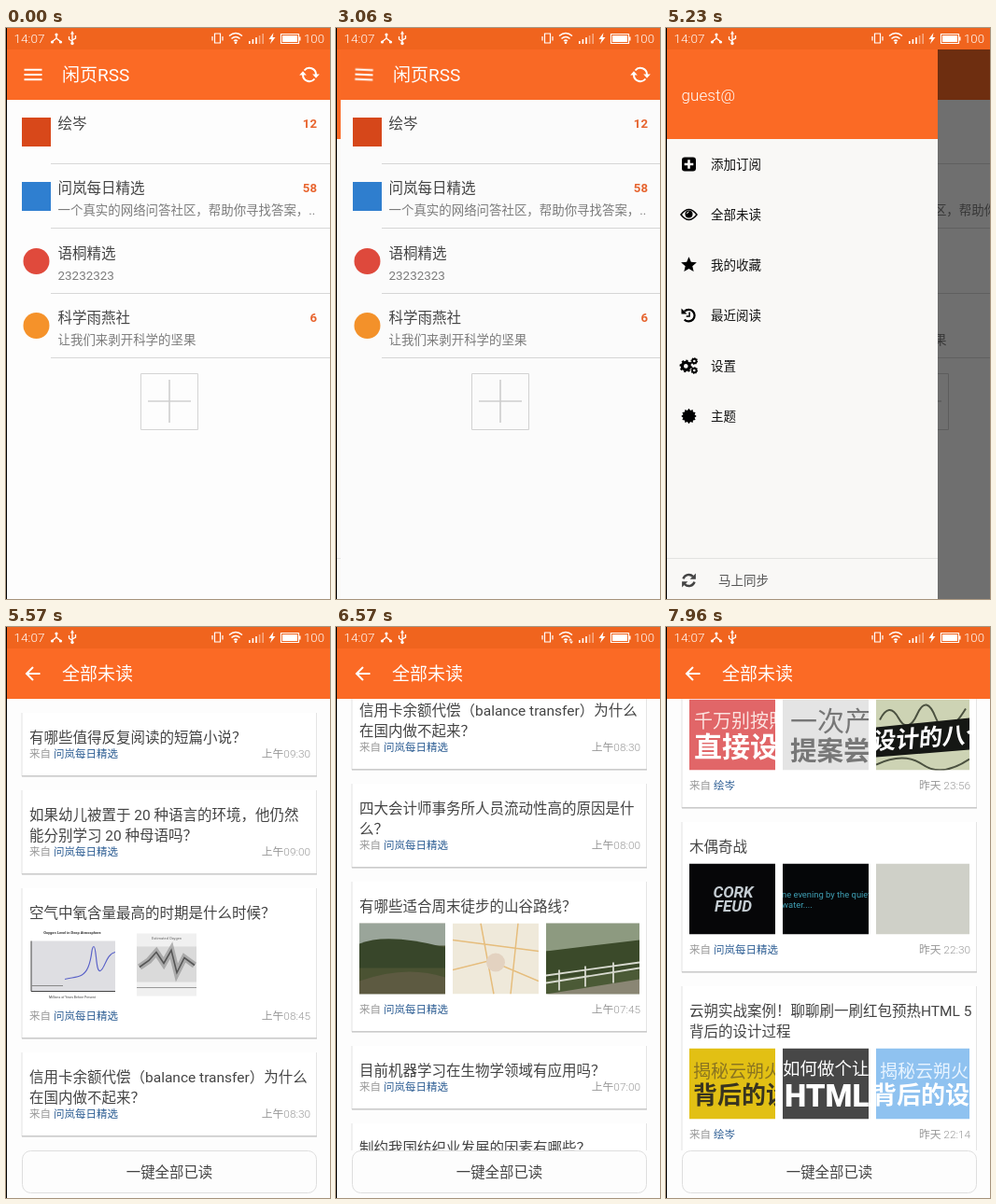
An HTML page that plays this animation: 347x612 px, repeating every 8000 ms.

```html
<!DOCTYPE html>
<html lang="zh-CN">
<head>
<meta charset="utf-8">
<title>闲页RSS</title>
<style>
  html, body { margin: 0; width: 100%; height: 100%; overflow: hidden; background: #fdfdfd; }
  #stage { display: block; width: 347px; height: 612px; }
  text { font-family: Roboto, "Noto Sans CJK SC", "Noto Sans CJK", sans-serif; white-space: pre; }
</style>
</head>
<body>
<svg id="stage" viewBox="0 0 347 612"></svg>
<script>
const LOOP = 8000;
const ORANGE = '#fb6a25', PAPER = '#fdfdfd';

// Drawing helpers
const rect = (x, y, w, h, fill, more = '') =>
  `<rect x="${x}" y="${y}" width="${w}" height="${h}" fill="${fill}" ${more}/>`;
const disc = (x, y, r, fill, more = '') =>
  `<circle cx="${x}" cy="${y}" r="${r}" fill="${fill}" ${more}/>`;
const line = (d, stroke, width, more = '') =>
  `<path d="${d}" fill="none" stroke="${stroke}" stroke-width="${width}" ${more}/>`;
const shape = (d, fill, more = '') => `<path d="${d}" fill="${fill}" ${more}/>`;
const text = (x, middle, size, str, fill, more = '') =>
  `<text x="${x}" y="${middle + size * 0.37}" font-size="${size}" fill="${fill}" ${more}>${str}</text>`;
const at = (x, y, body) => `<g transform="translate(${x} ${y})">${body}</g>`;
const twice = body => body + `<g transform="rotate(180)">${body}</g>`;
const END = 'text-anchor="end"', MID = 'text-anchor="middle"';
const BOLD = 'font-weight="700"', LIGHT = 'font-weight="300"';

const star = (points, outer, inner) => {
  const corners = Array.from({ length: points * 2 }, (_, i) => {
    const r = i % 2 ? inner : outer, a = i * Math.PI / points - Math.PI / 2;
    return `${(r * Math.cos(a)).toFixed(2)},${(r * Math.sin(a)).toFixed(2)}`;
  });
  return `<polygon points="${corners.join(' ')}"/>`;
};
const cog = (x, y, r) =>
  disc(x, y, r * 0.6, 'none', `stroke="#000" stroke-width="${r * 0.5}"`) +
  disc(x, y, r * 0.88, 'none', `stroke="#000" stroke-width="${r * 0.3}" pathLength="16" stroke-dasharray="1"`);

// Status bar
const signal = [3, 5, 7, 9, 11].map((h, i) =>
  rect(260 + i * 3.6, 17 - h, 1.6, h, '#fff', `opacity="${i < 3 ? 1 : 0.45}"`)).join('');
const statusBar = rect(0, 0, 347, 23, '#f0641e') +
  text(8.5, 11, 13.6, '14:07', '#fff', LIGHT) +
  line('M54 7V11L49 15M54 11L59 15', '#fff', 1.3) +
  disc(54, 7, 1.6, '#fff') + disc(49.5, 15, 1.6, '#fff') + disc(58.5, 15, 1.6, '#fff') +
  line('M71 5V17M67.5 9V12L71 14.5M74.5 8V11L71 13', '#fff', 1.3) +
  shape('M71 3L73 6.5H69z', '#fff') + disc(71, 16.5, 1.7, '#fff') +
  line('M223.5 6H229.5V16H223.5zM221 9V13.5M232 9V13.5', '#fff', 1.2) +
  line('M239 8.5Q246 2.5 253 8.5M241.5 11.5Q246 7.5 250.5 11.5M244 14Q246 12.3 248 14', '#fff', 1.5) +
  disc(246, 15.8, 1.3, '#fff') +
  `<g id="traffic">${shape('M249 14.5L251 12L253 14.5zM250 15.5H254L252 18z', '#fff')}</g>` +
  signal +
  shape('M286.5 5L281.5 12H284.5L283 17L288.5 10H285.5z', '#fff') +
  line('M294.5 6.5H313.5V16.5H294.5z', '#fff', 1.2, 'stroke-linejoin="round"') +
  rect(296, 8, 16, 7, '#fff') + rect(314, 9.5, 1.5, 4, '#fff') +
  text(319, 11, 13.2, '100', '#fff', LIGHT);

// Feed list
const feeds = [
  { name: '绘岑', count: 12, icon: rect(17, 96, 31, 31, '#d8481a') },
  { name: '问岚每日精选', count: 58, note: '一个真实的网络问答社区，帮助你寻找答案，..', icon: rect(17, 165, 31, 31, '#2f7fd0') },
  { name: '语桐精选', note: '23232323', icon: disc(32.5, 250, 14, '#e04a3c') },
  { name: '科学雨燕社', count: 6, note: '让我们来剥开科学的坚果', icon: disc(32.5, 319, 14, '#f5922a') }
];
const feedRow = ({ name, count = '', note = '', icon }, i) => {
  const y = Math.round(102 + i * 69.4);
  return icon + text(55.5, y, 15.5, name, '#444') +
    text(333, y, 13.2, count, '#e8642e', `${END} ${BOLD}`) +
    text(55.5, y + 24, 13.45, note, '#7c7c7c') +
    rect(48, y + 43, 299, 1, '#d8d8d8');
};
const home = rect(0, 23, 347, 589, PAPER) + rect(0, 23, 347, 54, ORANGE) +
  at(29, 50, `<g id="menu">${line('M-9.5 -5.2H9.5M-9.5 0H9.5M-9.5 5.2H9.5', '#fff', 2)}</g>`) +
  text(60, 50, 19, '闲页RSS', '#fff') +
  at(325, 50, twice(line('M-5.5 -4.5A7 7 0 0 1 7 0', '#fff', 2) + shape('M3.2 -.5H10.8L7 3.8z', '#fff'))) +
  feeds.map(feedRow).join('') +
  line('M144.5 370.5H205.5V430.5H144.5z', '#d4d4d4', 1) +
  line('M175 377V423M152 400H198', '#cfcfcf', 1.6);

// Drawer
const menuItems = [
  ['添加订阅', rect(-7.5, -7.5, 15, 15, '#000', 'rx="3"') + line('M0 -4.8V4.8M-4.8 0H4.8', '#f9f8f6', 2.6)],
  ['全部未读', line('M-8.5 0Q0 -11 8.5 0Q0 11 -8.5 0z', '#000', 1.5) + disc(0, -0.6, 4, '#000') +
    line('M-2 -1A2.2 2.2 0 0 1 0 -3', '#f9f8f6', 1)],
  ['我的收藏', star(5, 8.8, 4)],
  ['最近阅读', line('M-4.8 -4.2A6.3 6.3 0 1 1 -4.8 4.4', '#000', 2.2) +
    shape('M-8 -7.5V-1.5H-2z', '#000') + line('M.6 -3.5V1H-2.8', '#000', 1.5)],
  ['设置', cog(-3.2, 0.4, 6.6) + cog(5.8, -5, 3.7) + cog(5.8, 5, 3.7)],
  ['主题', star(12, 8.2, 6.3)]
];
const drawer = rect(1, 23, 290, 589, '#f9f8f6') + rect(1, 23, 290, 96, ORANGE) +
  text(16.5, 72, 17.1, 'guest@', '#fff', LIGHT) +
  rect(1, 173, 290, 54, '#000', 'id="press"') +
  menuItems.map(([label, icon], i) =>
    at(24.5, 146 + i * 54, icon) + text(48, 146 + i * 54, 13.5, label, '#111')).join('') +
  rect(1, 568, 290, 1, '#e2e2e0') +
  at(24.5, 592, twice(line('M-6 -1.6A6.2 6.2 0 0 1 4.4 -4.2', '#444', 2.5) + shape('M7.4 -7.4V-1.2H1.2z', '#444'))) +
  text(56, 592, 13.5, '马上同步', '#555');

// Article list
const frame = (width, fill, body = '') => ({ width, body: rect(0, 0, width, 76, fill) + body });
const chart = frame(92, '#fff',
  text(46, 3, 4, "Oxygen Level in Deep Atmosphere", '#333', `${MID} ${BOLD}`) +
  rect(2, 12, 90, 54, '#dedee2') + line('M2 12V66H92', '#444', 1) + line('M2 60H36', '#888', 1) +
  line('M38 53C50 50 58 52 63 40S66 18 69 18S71 46 76 44S82 26 92 24', '#5a62c8', 1.2) +
  text(46, 72, 3.5, 'Millions of Years Before Present', '#444', MID));
const grayChart = frame(92, '#fff',
  rect(15, 4, 64, 67, '#f0f0f0') + rect(15, 18, 64, 38, '#dadada') +
  line('M18 40L28 33L36 24L44 36L52 22L58 46L66 30L77 38', '#8a8a8a', 7, 'opacity=".6"') +
  line('M18 40L28 33L36 24L44 36L52 22L58 46L66 30L77 38', '#555', 1.6) +
  line('M15 62H79', '#999', 1) + text(47, 9, 4, 'Estimated Oxygen', '#666', MID));
const valley = frame(92, '#4a5232',
  rect(0, 0, 92, 24, '#9aa59a') + shape('M0 22Q30 10 92 26V48H0z', '#38462a') + shape('M0 62Q50 44 92 58V76H0z', '#5d5a41'));
const map = frame(92, '#efe9da',
  line('M0 50L40 40L92 62M30 0L44 76M0 18L92 30M70 0L62 76', '#e6bd7c', 1.5) + disc(46, 42, 10, '#e3d2c0'));
const fence = frame(100, '#4b5a36',
  rect(0, 0, 100, 30, '#8d9a80') + shape('M0 30L100 18V50L0 60z', '#3b4a2a') +
  shape('M0 76L100 60V76z', '#8a8674') + line('M0 56L100 42M0 64L100 48M14 50V72M42 46V68M72 42V64', '#d8dad0', 1.8));
const poster = (width, fill, small, large) => frame(width, fill, small + large);

const cards = [
  { title: ['有哪些值得反复阅读的短篇小说？'], from: 'ask', time: '上午09:30' },
  { title: ['如果幼儿被置于 20 种语言的环境，他仍然', '能分别学习 20 种母语吗？'], from: 'ask', time: '上午09:00' },
  { title: ['空气中氧含量最高的时期是什么时候？'], from: 'ask', time: '上午08:45', pics: [chart, grayChart] },
  { title: ['信用卡余额代偿（balance transfer）为什么', '在国内做不起来？'], from: 'ask', time: '上午08:30' },
  { title: ['四大会计师事务所人员流动性高的原因是什', '么？'], from: 'ask', time: '上午08:00' },
  { title: ['有哪些适合周末徒步的山谷路线？'], from: 'ask', time: '上午07:45', pics: [valley, map, fence] },
  { title: ['目前机器学习在生物学领域有应用吗？'], from: 'ask', time: '上午07:00' },
  { title: ['制约我国纺织业发展的因素有哪些？'], from: 'ask', time: '凌晨02:30' },
  { title: ['换个视角！那么用户到底想要怎么样的产', '品？'], from: 'art', time: '昨天 23:56', pics: [
    poster(92, '#e16668', text(5, 23, 20, '千万别按照', '#fbe3e0', LIGHT), text(5, 50, 30, '直接设计', '#fff', 'font-weight="900"')),
    poster(92, '#e4e4e4', text(8, 24, 29, '一次产品', '#777', LIGHT), text(8, 55, 28.5, '提案尝试', '#777', 'font-weight="900"')),
    poster(100, '#cdd3b4',
      line('M4 22Q14 2 24 20T44 16T64 20T96 10M0 70Q30 56 50 70T100 64', '#4b5140', 2) +
      shape('M0 30L100 20V54L0 62z', '#151714'),
      text(-4, 41, 25, '设计的八个', '#fff', `${BOLD} transform="rotate(-4 50 41) skewX(-8) translate(6 0)"`))
  ] },
  { title: ['木偶奇战'], from: 'ask', time: '昨天 22:30', pics: [
    poster(92, '#060608', text(47, 30, 17, 'CORK', '#c4ccd2', `${MID} ${BOLD} font-style="italic"`),
      text(47, 45, 17, 'FEUD', '#c4ccd2', `${MID} ${BOLD} font-style="italic"`)),
    poster(92, '#050608', text(-1, 33, 9.4, 'ne evening by the quiet', '#3f9fb4'), text(-1, 44, 9.4, 'water....', '#3f9fb4')),
    frame(100, '#cfd0c8')
  ] },
  { title: ['云朔实战案例！聊聊刷一刷红包预热HTML 5', '背后的设计过程'], from: 'art', time: '昨天 22:14', pics: [
    poster(92, '#e2c014', text(4, 24, 19, '揭秘云朔火', '#8a7420', LIGHT), text(4, 50, 26, '背后的设计', '#383420', 'font-weight="900"')),
    poster(92, '#474747', text(0, 22, 18.5, '如何做个让人', '#fff'), text(2, 50, 33, 'HTML5', '#fff', 'font-weight="900"')),
    poster(100, '#8fc2f0', text(4, 24, 19, '揭秘云朔火', '#e8f4ff', LIGHT), text(-4, 50, 26, '背后的设计', '#fff', 'font-weight="900"'))
  ] }
];
const sources = { ask: '问岚每日精选', art: '绘岑' };

let cardTop = 92;
const drawCard = ({ title, from, time, pics }) => {
  const top = cardTop, last = top + 26 + (title.length - 1) * 22;
  const meta = last + (pics ? 111 : 18), bottom = meta + 24;
  cardTop = bottom + 15;
  return rect(17, top, 316, bottom - top, '#fff') +
    rect(16.5, top, 1, bottom - top, '#e4e4e4') + rect(332, top, 1, bottom - top, '#e4e4e4') +
    rect(17, bottom - 1, 316, 1.6, '#cbcbcb') +
    title.map((row, i) => text(25, top + 26 + i * 22, 15.5, row, '#444')).join('') +
    (pics || []).map(({ width, body }, i) =>
      `<svg x="${25 + i * 100}" y="${last + 18.5}" width="${width}" height="76">${body}</svg>`).join('') +
    text(25, meta, 11.5, '来自', '#999', LIGHT) + text(51, meta, 11.5, sources[from], '#2c5d93') +
    text(326, meta, 11.8, time, '#999', `${END} ${LIGHT}`);
};
const reader = rect(0, 23, 347, 620, PAPER) +
  `<svg y="77" width="347" height="484" viewBox="0 77 347 484"><g id="list">${cards.map(drawCard).join('')}</g></svg>` +
  rect(0, 23, 347, 54, ORANGE) +
  line('M36.5 50H22M29 43L22 50L29 57', '#fff', 2) +
  text(60, 50, 19, '全部未读', '#fff') +
  rect(17.5, 561.5, 315, 45, PAPER, 'rx="9" stroke="#dedede"') +
  text(175, 584, 15.4, '一键全部已读', '#444', MID);

document.getElementById('stage').innerHTML =
  `<g id="home">${home}</g>` + rect(0, 23, 347, 589, '#000', 'id="scrim"') +
  `<g id="drawer">${drawer}</g><g id="reader">${reader}</g>` + statusBar + rect(0, 0, 1, 612, '#000');

// Motion: every track is a list of [ms, value] holds
const valueAt = (points, t) => {
  const i = points.findIndex(([ms]) => ms >= t);
  if (i < 0) return points[points.length - 1][1];
  if (i === 0) return points[0][1];
  const [[t0, v0], [t1, v1]] = [points[i - 1], points[i]];
  return v0 + (v1 - v0) * (t - t0) / (t1 - t0);
};
const glide = (from, to, steps, points) => Array.from({ length: steps + 1 }, (_, i) => {
  const t = from + (to - from) * i / steps;
  return [Math.floor(t / 10) * 10, valueAt(points, t)];
});
const play = (id, track, style) => {
  const holds = [...track, [LOOP, track[track.length - 1][1]]];
  document.getElementById(id).animate(
    holds.map(([ms, v]) => ({ offset: ms / LOOP, easing: 'steps(1, end)', ...style(v) })),
    { duration: LOOP, iterations: Infinity });
};

const opening = [[0, 0], ...glide(3060, 3750, 12,
  [[3060, 0.014], [3200, 0.12], [3400, 0.6], [3560, 0.9], [3750, 1]])];
const entering = [[0, 0], ...glide(5400, 5570, 3, [[5340, 0], [5570, 1]])];
const scrolling = [[0, 0],
  ...glide(6110, 7200, 19, [[6052, 0], [6282, 93], [6500, 330], [6750, 560], [6970, 660], [7200, 687]]),
  ...glide(7620, 7960, 6, [[7563, 687], [7620, 705], [7790, 860], [7960, 997]])];
const fade = v => ({ opacity: v });

play('home', opening, p => ({ transform: `translateX(${Math.round(96.5 * p)}px)` }));
play('menu', opening, p => ({ transform: `rotate(${180 * p}deg)` }));
play('scrim', opening, p => fade(0.56 * p));
play('drawer', opening, p => ({ transform: `translateX(${Math.round(290 * (p - 1))}px)` }));
play('press', [[0, 0], [4700, 0.1], [5000, 0]], fade);
play('reader', entering, p => ({ opacity: p, transform: `translateY(${Math.round(48 * (1 - p))}px)` }));
play('list', scrolling, y => ({ transform: `translateY(${-Math.round(y)}px)` }));
play('traffic', [[0, 0], [420, 1], [1440, 0], [3290, 1], [4410, 0], [6110, 1], [7200, 0]], fade);
</script>
</body>
</html>
```
